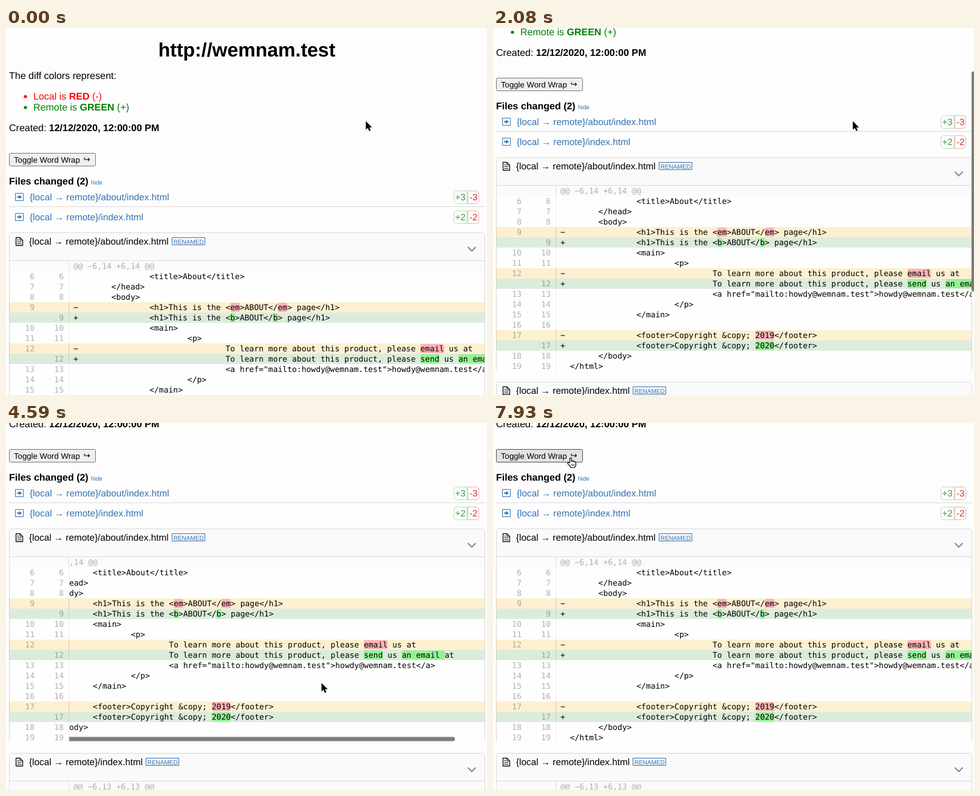
An HTML page with a canvas that plays this animation: 792x605 px, repeating every 8000 ms.

```html
<!DOCTYPE html>
<html lang="en">
<head>
<meta charset="utf-8">
<title>Page diff</title>
<style>
  html, body { margin: 0; width: 100%; height: 100%; overflow: hidden; background: #fdfdfd; }
  canvas { display: block; width: 792px; height: 605px; }
</style>
</head>
<body>
<canvas id="stage" width="792" height="605"></canvas>
<script>
const ctx = document.getElementById('stage').getContext('2d');
const W = 792, H = 605, LOOP = 8000;
const SANS = '"Liberation Sans", Arial, sans-serif';
const MONO = '13px "DejaVu Sans Mono", Menlo, monospace';
const CHAR = 7.826, ROW = 17, GUTTER = 104, CODE_X = 111;
const BLUE = '#3572b0', EDGE = '#d9d9d9';
const SITE = 'wemnam.test';

// Type, indent, text; [ ] marks the changed words.
const DIFF = [
  [' ', 16, '<title>About</title>'],
  [' ', 8, '</head>'],
  [' ', 8, '<body>'],
  ['-', 16, '<h1>This is the <[em]>ABOUT</[em]> page</h1>'],
  ['+', 16, '<h1>This is the <[b]>ABOUT</[b]> page</h1>'],
  [' ', 16, '<main>'],
  [' ', 24, '<p>'],
  ['-', 32, 'To learn more about this product, please [email] us at'],
  ['+', 32, 'To learn more about this product, please [send] us [an email ]at'],
  [' ', 32, `<a href="mailto:howdy@${SITE}">howdy@${SITE}</a>`],
  [' ', 24, '</p>'],
  [' ', 16, '</main>'],
  [' ', 0, ''],
  ['-', 16, '<footer>Copyright &copy; [2019]</footer>'],
  ['+', 16, '<footer>Copyright &copy; [2020]</footer>'],
  [' ', 8, '</body>'],
  [' ', 2, '</html>']
];
const ROW_STYLE = {
  ' ': { edge: '#eeeeee' },
  '-': { fill: '#fdf0d0', edge: '#f3b9b9', mark: '#ffb3b8' },
  '+': { fill: '#dcecdc', edge: '#b4e2b4', mark: '#93f293' }
};

const ARROW = new Path2D('M0 0V14.2L3.2 11.2 5.6 16.4 8 15.3 5.7 10.4H10.2Z');
const HAND = new Path2D('M4.5 9V2.2a1.4 1.4 0 0 1 2.8 0V7l.2-.6a1.3 1.3 0 0 1 2.5.2v.6a1.2 1.2 0 0 1 2.3.3v.6' +
  'a1.1 1.1 0 0 1 2.1.4v4c0 2-1.6 3-1.8 4.5H6.2C6 15 3.5 13.5 1 10.4a1.3 1.3 0 0 1 2-1.6z');

const clamp = v => Math.min(1, Math.max(0, v));
const span = (t, a, b) => clamp((t - a) / (b - a));
const mix = (a, b, k) => a + (b - a) * k;
const easeOut = k => 1 - (1 - k) ** 2;
const easeInOut = k => k * k * (3 - 2 * k);

function track(t, keys) {
  let value = keys[0][1];
  for (let i = 1; i < keys.length; i++) {
    if (t >= keys[i - 1][0]) value = mix(keys[i - 1][1], keys[i][1], span(t, keys[i - 1][0], keys[i][0]));
  }
  return value;
}

function text(str, x, y, size = 16, color = '#000', weight = '') {
  ctx.font = `${weight} ${size}px ${SANS}`;
  ctx.fillStyle = color;
  ctx.fillText(str, x, y);
  return x + ctx.measureText(str).width;
}

function mono(str, x, y, color = '#000', align = 'left') {
  ctx.font = MONO;
  ctx.textAlign = align;
  ctx.fillStyle = color;
  ctx.fillText(str, x, y);
  ctx.textAlign = 'left';
}

function rect(x, y, w, h, color) {
  ctx.fillStyle = color;
  ctx.fillRect(x, y, w, h);
}

function round(x, y, w, h, r, fill, stroke) {
  ctx.beginPath();
  ctx.roundRect(x, y, w, h, r);
  if (fill) { ctx.fillStyle = fill; ctx.fill(); }
  if (stroke) { ctx.strokeStyle = stroke; ctx.lineWidth = 1; ctx.stroke(); }
}

function line(points, color, width = 1) {
  ctx.beginPath();
  points.forEach(([x, y]) => ctx.lineTo(x, y));
  ctx.strokeStyle = color;
  ctx.lineWidth = width;
  ctx.stroke();
}

function bullet(y, color, start, word, end) {
  ctx.fillStyle = color;
  ctx.beginPath();
  ctx.arc(32, y - 5, 2.6, 0, 7);
  ctx.fill();
  const x = text(word, text(start, 45, y, 16, color), y, 16, color, 'bold');
  text(end, x, y, 16, color);
}

function listItem(y, name, count) {
  round(15.5, y - 11.5, 13, 12, 0, null, BLUE);
  rect(18, y - 6.5, 4, 2, BLUE);
  ctx.beginPath();
  ctx.moveTo(21.5, y - 9);
  ctx.lineTo(26, y - 5.5);
  ctx.lineTo(21.5, y - 2);
  ctx.fill();
  text(name, 39, y, 15.3, BLUE);
  round(737.5, y - 15.5, 21.5, 21, [5, 0, 0, 5], null, '#b4e2b4');
  round(760.5, y - 15.5, 18, 21, [0, 5, 5, 0], null, '#e9aeae');
  text('+' + count, 739.5, y, 15, '#399839');
  text('-' + count, 763, y, 15, '#cc3333');
}

function fileHeader(y, name) {
  rect(6, y + 1, 782, 45, '#fafafa');
  rect(6, y + 46, 782, 1, EDGE);
  // Document icon
  line([[16.5, y + 8.5], [23, y + 8.5], [27.5, y + 13], [27.5, y + 21.5], [16.5, y + 21.5], [16.5, y + 8]], '#111', 1.3);
  line([[23, y + 8.5], [23, y + 13], [27.5, y + 13]], '#111');
  for (const d of [12.5, 15.5, 18.5]) line([[18.5, y + d], [d < 13 ? 21.5 : 25.5, y + d]], '#111');
  const x = Math.round(text(name, 38, y + 20, 15.3)) + 5;
  round(x + .5, y + 8.5, 54, 12, 0, null, BLUE);
  text('RENAMED', x + 2.7, y + 18.5, 10, BLUE);
  line([[760.5, y + 24], [767, y + 30.5], [773.5, y + 24]], '#888', 2);
}

function hunk(y, label, shift) {
  rect(6, y, 782, ROW, '#fafbfd');
  rect(5, y, 1, ROW, '#d5e4f2');
  rect(103, y, 1, ROW, '#d5e4f2');
  clipCode(y, ROW, () => mono(label, CODE_X - shift, y + 13, 'rgba(0,0,0,.3)'));
}

function clipCode(y, h, draw) {
  ctx.save();
  ctx.beginPath();
  ctx.rect(GUTTER, y, 788 - GUTTER, h);
  ctx.clip();
  draw();
  ctx.restore();
}

function codeLine(type, indent, source, y, shift) {
  const x0 = CODE_X - shift;
  if (type !== ' ') mono(type === '-' ? '−' : '+', x0, y + 13);
  let x = x0 + indent * CHAR;
  source.split(/[\[\]]/).forEach((part, i) => {
    const w = part.length * CHAR;
    if (i % 2) round(x, y + 1, w, 15, 2.6, ROW_STYLE[type].mark);
    mono(part, x, y + 13);
    x += w;
  });
}

function diffRows(top, shift) {
  let before = 6, after = 6;
  DIFF.forEach(([type, indent, source], i) => {
    const y = top + i * ROW, style = ROW_STYLE[type];
    rect(6, y, 782, ROW, style.fill || '#fefefe');
    if (style.fill) rect(5, y, 1, ROW, style.edge);
    rect(103, y, 1, ROW, style.edge);
    if (type !== '+') mono(before++, 47, y + 13, 'rgba(0,0,0,.3)', 'right');
    if (type !== '-') mono(after++, 95, y + 13, 'rgba(0,0,0,.3)', 'right');
    clipCode(y, ROW, () => codeLine(type, indent, source, y, shift));
  });
}

function page(shift, barAlpha, hover) {
  const about = '{local → remote}/about/index.html';
  const home = '{local → remote}/index.html';

  ctx.textAlign = 'center';
  text('http://' + SITE, 396.5, 47, 32, '#000', 'bold');
  ctx.textAlign = 'left';
  text('The diff colors represent:', 5, 84);
  bullet(118, '#ff0000', 'Local is ', 'RED', ' (-)');
  bullet(136, '#008000', 'Remote is ', 'GREEN', ' (+)');
  text('12/12/2020, 12:00:00 PM', text('Created: ', 5, 170), 170, 16, '#000', 'bold');

  round(5.5, 206.5, 142, 21, 2, hover ? '#e3e3e3' : '#efefef', hover ? '#4f4f4f' : '#767676');
  text('Toggle Word Wrap', 13, 222, 13.2);
  ctx.font = '13.3px "DejaVu Sans", sans-serif';
  ctx.fillText('↪', 127.5, 221);

  text('Files changed (2)', 5, 258, 16, '#000', 'bold');
  text('hide', 140, 258, 10, BLUE);
  listItem(284, about, 3);
  rect(5, 294, 784, 1, EDGE);
  listItem(317, home, 2);

  round(5.5, 337.5, 783, 352, 3, null, EDGE);
  fileHeader(337, about);
  hunk(384, '@@ −6,14 +6,14 @@', shift);
  diffRows(401, shift);
  if (barAlpha > 0) {
    const left = 8 + shift * .862;
    clipCode(680, 9, () => round(left, 680.5, 651, 7, 3.5, `rgba(0,0,0,${.5 * barAlpha})`));
  }

  round(5.5, 707.5, 783, 340, 3, null, EDGE);
  fileHeader(707, home);
  hunk(754, '@@ −6,13 +6,13 @@', 0);
}

function pointerAt(t) {
  if (t < 6930) {
    const k = easeOut(easeOut(span(t, 2820, 3360)));
    return [mix(592.5, 519.5, k), mix(153.5, 428.5, k)];
  }
  if (t < 7520) {
    const k = easeInOut(span(t, 6930, 7280)), n = 1 - k;
    return [n * n * 519.5 + 2 * n * k * 530 + k * k * 408.5, n * n * 428.5 + 2 * n * k * 260 + k * k * 109];
  }
  const k = easeOut(span(t, 7520, 7930));
  return [mix(408.5, 128, k), mix(109, 56.5, k)];
}

function pointer(x, y, hand) {
  ctx.save();
  ctx.lineJoin = 'round';
  if (hand) {
    ctx.translate(x - 6, y);
    ctx.fillStyle = '#fff';
    ctx.fill(HAND);
    ctx.strokeStyle = '#000';
    ctx.lineWidth = 1.2;
    ctx.stroke(HAND);
    for (const d of [7.6, 9.6, 11.6]) line([[d, 11], [d, 14.5]], '#000', .8);
  } else {
    ctx.translate(x, y);
    ctx.strokeStyle = '#fff';
    ctx.lineWidth = 2;
    ctx.stroke(ARROW);
    ctx.fillStyle = '#000';
    ctx.fill(ARROW);
  }
  ctx.restore();
}

function draw(t) {
  const scroll = Math.round(track(t, [[830, 0], [1040, 23], [1550, 74], [1640, 80], [2080, 124], [2430, 163]]));
  const shift = track(t, [[3890, 0], [4590, 93], [4940, 135], [5240, 135], [5800, 64], [6310, 0]]);
  const sideBar = t < 830 ? 0 : 1 - span(t, 2820, 3090);
  const lowBar = t < 3890 ? 0 : 1 - span(t, 6390, 6570);
  const [x, y] = pointerAt(t);
  const onButton = t > 7520 && x < 148;

  rect(0, 0, W, H, '#fdfdfd');
  ctx.save();
  ctx.translate(0, -scroll);
  page(shift, lowBar, onButton);
  ctx.restore();
  if (sideBar > 0) round(788, scroll * .6 - 3, 7, 363, 3.5, `rgba(0,0,0,${.5 * sideBar})`);
  pointer(x, y, onButton);
}

ctx.textRendering = 'geometricPrecision';
const start = performance.now();
function tick() {
  draw((performance.now() - start) % LOOP);
  requestAnimationFrame(tick);
}
tick();
</script>
</body>
</html>
```
